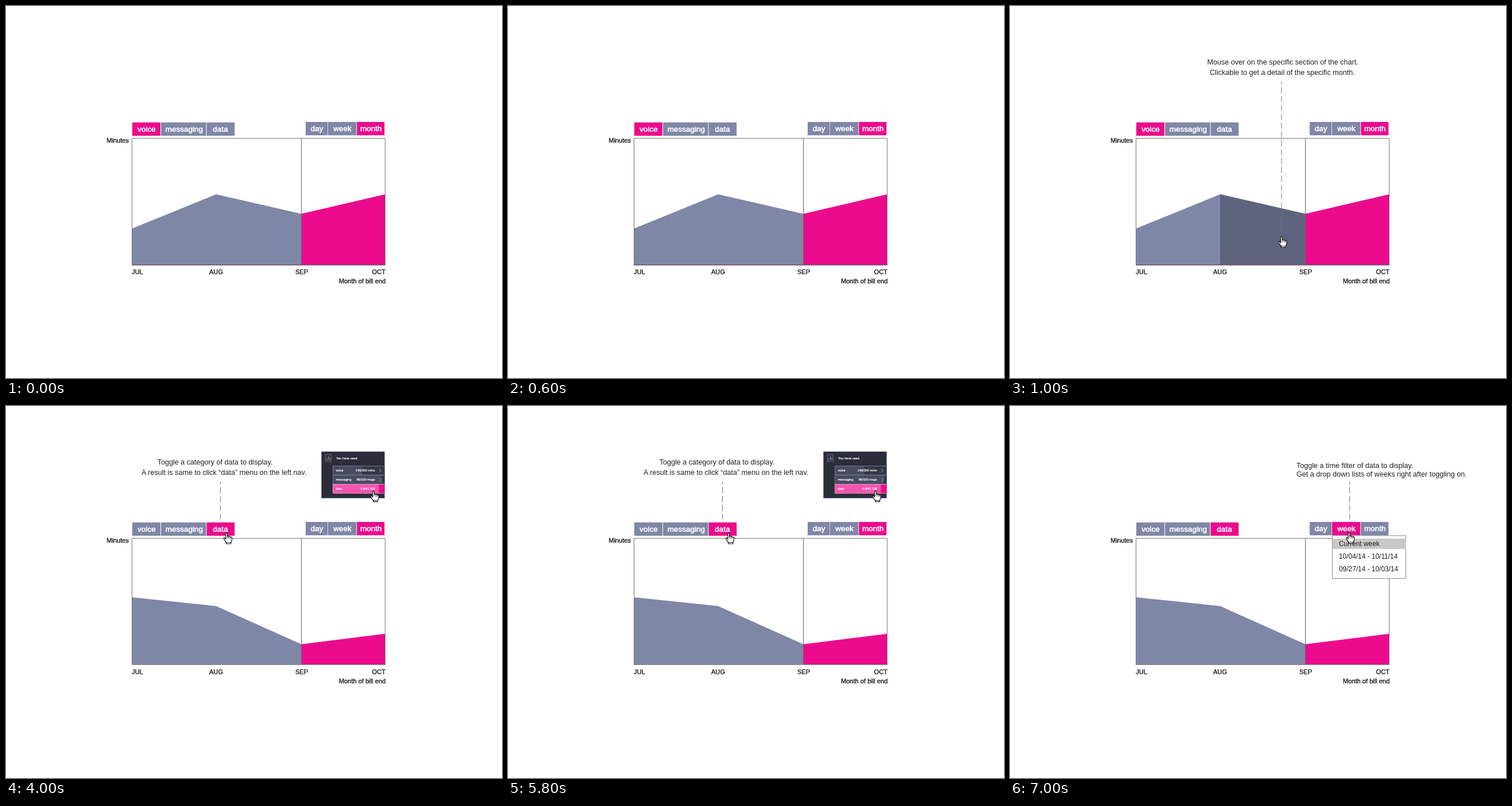
Recreate the animation shown at these times as an HTML page. Size 864 by 648 pixels, loop 8000 ms.

```html
<!DOCTYPE html>
<html lang="en">
<head>
<meta charset="utf-8">
<title>Usage chart</title>
<style>
  html, body { margin: 0; width: 100%; height: 100%; overflow: hidden; background: #fff; }
  svg { display: block; width: 864px; height: 648px; }
  text { font-family: "Liberation Sans", Arial, sans-serif; fill: #231f20; }
  .note { font-size: 12.6px; }
  .axis { font-size: 11.1px; stroke: #231f20; stroke-width: .4; }
  .tab { font-size: 13.5px; fill: #fff; stroke: #fff; stroke-width: .55; text-anchor: middle; }
  .item { font-size: 11.9px; }
  .mini { font-size: 5.6px; fill: #fff; stroke: #fff; stroke-width: .2; }
  .end { text-anchor: end; }
  .mid { text-anchor: middle; }
</style>
</head>
<body>
<svg id="stage" viewBox="0 0 864 648" xmlns="http://www.w3.org/2000/svg"></svg>
<script>
const SLATE = '#7f87a6', PINK = '#eb0a8c', DARK = '#5f647e', LINE = '#77777b';
const LOOP = 8000;

const rect = (x, y, w, h, fill, more = '') =>
  `<rect x="${x}" y="${y}" width="${w}" height="${h}" fill="${fill}" ${more}/>`;
const text = (x, y, cls, str) => `<text x="${x}" y="${y}" class="${cls}">${str}</text>`;
const poly = (fill, ...pts) => `<polygon points="${pts.join(' ')}" fill="${fill}"/>`;
const path = (d, stroke, width = 1, more = '') =>
  `<path d="${d}" fill="none" stroke="${stroke}" stroke-width="${width}" ${more}/>`;
const guide = (x, end) =>
  path(`M${x} 131.5V${end}`, '#77777b', 1, 'stroke-dasharray="11 4.4" stroke-dashoffset="5.5"');

function hand(x, y) {
  return `<g transform="translate(${x} ${y})" stroke="#111" stroke-width="1.2" stroke-linejoin="round">
    <path fill="#fff" d="M4.4 11.6V2.2C4.4.2 7.2.2 7.2 2.2V6.6C7.6 5.6 9.6 5.8 9.8 7.1
      C10.5 6.3 12.2 6.7 12.4 8C13.3 7.3 15 7.9 15 9.3V13C15 14.8 13.6 15.6 13.4 17.2V19.5H5.4V17.6
      C4.4 15.6 2.2 13.4 1 11C.4 9.2 2.2 8.6 3.2 9.8Z"/>
    <path fill="none" stroke-width=".9" d="M7.2 6.5V10.2M9.8 7.1V10.4M12.4 8V10.8M5.4 17.2H13.4"/>
  </g>`;
}

// name, left edge, width, text centre
const LEFT_TABS = [['voice', 220, 49, 245], ['messaging', 270, 78.5, 310.3], ['data', 349.5, 48.8, 373.5]];
const RIGHT_TABS = [['day', 522, 38.3, 541.7], ['week', 561, 49.4, 586], ['month', 611.3, 48, 635.7]];

const tabs = (list, top, active) => list.map(([name, x, w, mid]) =>
  rect(x, top, w, 23.2, name === active ? PINK : SLATE) +
  text(mid, top + 16.2, 'tab', name)).join('');

function chart(heights, bottom, hover) {
  const xs = [220, 366, 514.5, 660.5];
  const [a, b, c, d] = xs.map((x, i) => `${x},${heights[i]}`);
  const base = i => `${xs[i]},${bottom}`;
  return poly(SLATE, a, b, c, base(2), base(0)) +
    (hover ? poly(DARK, b, c, base(2), base(1)) : '') +
    poly(PINK, c, d, base(3), base(2)) +
    rect(219.5, 230.5, 441, bottom - 230.5, 'none', `stroke="${LINE}"`) +
    path(`M514.5 230.5V${bottom}`, '#68636f');
}

const voiceChart = hover => chart([387.5, 328, 362, 328], 451.5, hover) +
  path('M220 450.7H660', '#8d4c86', 1);
const dataChart = () => chart([333.3, 348.5, 415, 396.8], 450.5, false);

function axes() {
  return text(214, 237.7, 'axis end', 'Minutes') +
    text(219.3, 467.2, 'axis', 'JUL') + text(366, 467.2, 'axis mid', 'AUG') +
    text(515, 467.2, 'axis mid', 'SEP') + text(661, 467.2, 'axis end', 'OCT') +
    text(661.3, 483, 'axis end', 'Month of bill end');
}

function panel() {
  // label, value, top, fill width
  const rows = [['voice', '248/300 mins', 104.5, 51], ['messaging', '96/100 msgs', 120.5, 86], ['data', '0.64/1 GB', 136.5, 80]];
  const body = rows.map(([label, value, y, w]) => {
    const hot = label === 'data';
    return rect(569.5, y, 90, 15.5, hot ? PINK : '#343746') +
      rect(569.5, y, w, 15.5, hot ? '#f555b0' : '#484c60') +
      path(`M659.5 ${y}H569.5V${y + 15.7}H659.5`, hot ? '#f9a9d5' : SLATE, .8) +
      text(574.5, y + 9.4, 'mini', label) + text(642.7, y + 9.4, 'mini end', value) +
      path(`M650 ${y + 4.6}l3.2 3.4l-3.2 3.4`, hot ? '#b0407f' : '#a9adbd', .9);
  }).join('');
  return rect(549.5, 79.5, 110, 81, '#2b2d39', `stroke="${SLATE}" stroke-width=".8"`) +
    rect(556.5, 84.8, 10.2, 12, 'none', 'stroke="#777b8c" stroke-width=".8"') +
    path('M559 94.5V91M561.6 94.5V87.2M564.2 94.5V89.3', '#8b8fa0', 1.2) +
    text(575, 93.2, 'mini', 'You have used') + body + hand(634.2, 147.2);
}

function dropdown() {
  return rect(561.5, 225.8, 128, 74.7, '#fff', `stroke="${SLATE}"`) +
    rect(562, 231, 128, 18, '#c8c8c8') +
    text(573, 244, 'item', 'Current week') +
    text(573, 266, 'item', '10/04/14 - 10/11/14') +
    text(573, 288, 'item', '09/27/14 - 10/03/14');
}

const view = (plot, left, right, extra) =>
  plot + axes() + tabs(LEFT_TABS, 202.8, left) + tabs(RIGHT_TABS, 202, right) + extra;

const SCENES = [
  { at: 0, draw: () => view(voiceChart(false), 'voice', 'month', '') },
  { at: 1000, draw: () => view(voiceChart(true), 'voice', 'month',
      text(343.5, 102.3, 'note', 'Mouse over on the specific section of the chart.') +
      text(348, 120.2, 'note', 'Clickable to get a detail of the specific month.') +
      guide(473, 394) + hand(467, 401)) },
  { at: 4000, draw: () => view(dataChart(), 'data', 'month',
      text(263.7, 101.6, 'note', 'Toggle a category of data to display.') +
      text(236, 120.2, 'note', 'A result is same to click “data” menu on the left nav.') +
      guide(373.5, 197.5) + hand(378.5, 220.5) + panel()) },
  { at: 7000, draw: () => view(dataChart(), 'data', 'week',
      text(499, 108.2, 'note', 'Toggle a time filter of data to display.') +
      text(499, 123.3, 'note', 'Get a drop down lists of weeks right after toggling on.') +
      guide(591.7, 197.5) + dropdown() + hand(584.7, 220)) },
];

const stage = document.getElementById('stage');
stage.innerHTML = SCENES.map(s => `<g>${s.draw()}</g>`).join('');
const groups = [...stage.children];

function show(now) {
  const t = now % LOOP;
  const current = SCENES.findLastIndex(s => t >= s.at);
  groups.forEach((g, i) => { g.style.display = i === current ? '' : 'none'; });
}

const start = performance.now();
function tick() {
  show(performance.now() - start);
  requestAnimationFrame(tick);
}
tick();
</script>
</body>
</html>
```
